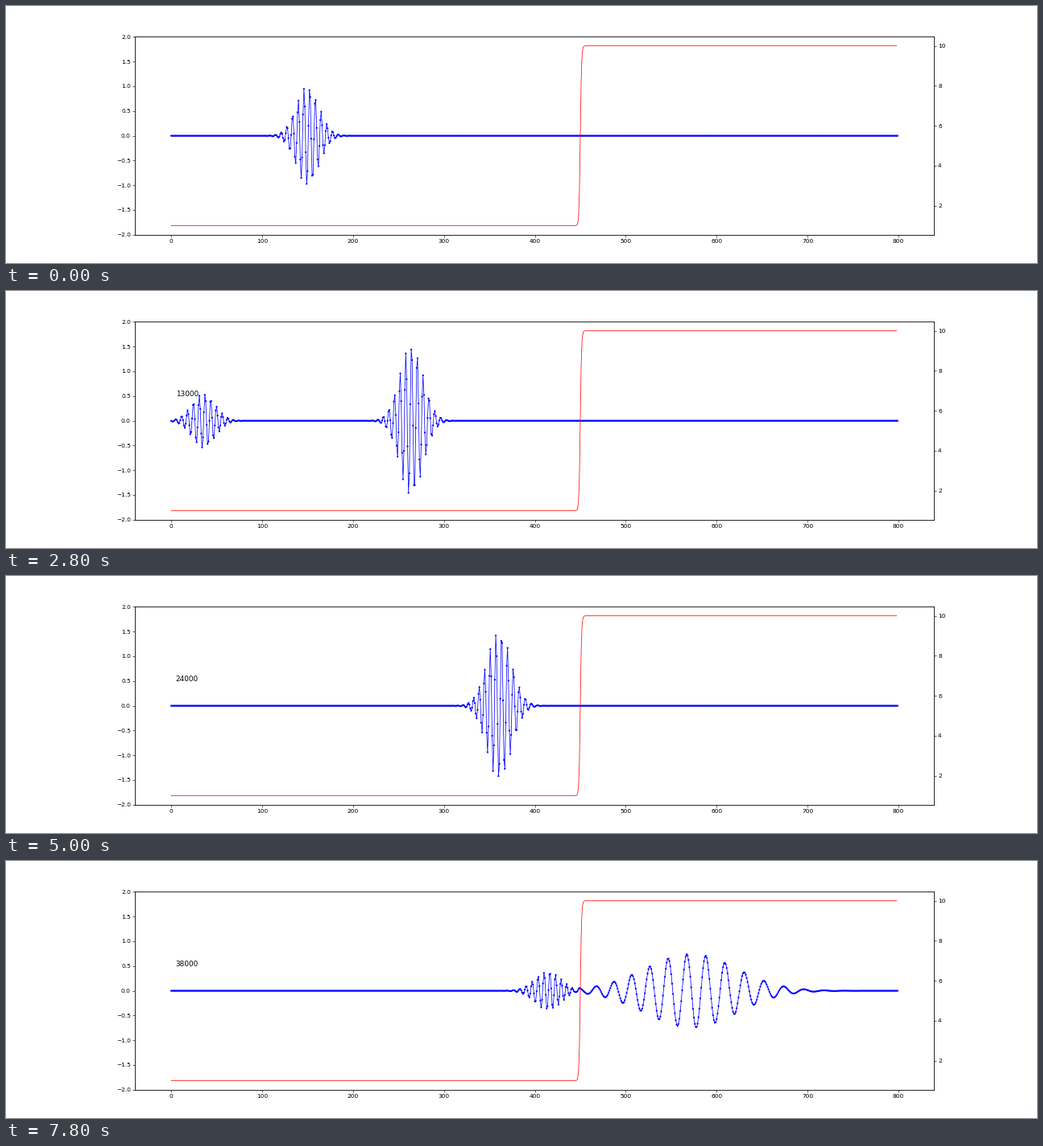
Recreate the animation shown at these times as a matplotlib script. Size 1280x320 px, loop 8000 ms.

```python
import numpy as np
import matplotlib.pyplot as plt
from matplotlib.animation import FuncAnimation

CELLS = 800
PAD = 300              # hidden cells that let the left pulse leave the view
DT = 0.01
STEPS_PER_FRAME = 1000
FRAMES = 40
INTERVAL = 200


def stiffness(x):
    """Smooth step from 1 to 10 around cell 450."""
    return 1 + 4.5 * (1 + np.tanh(0.75 * (x - 450)))


def simulate():
    """Snapshots of u_tt = (g u_x)_x, one per 1000 time steps."""
    x = np.arange(-PAD, CELLS, dtype=float)
    envelope = np.exp(-0.5 * ((x - 150) / 12.5) ** 2)
    u = np.sin(x) * envelope
    v = -2 * np.cos(x) * envelope
    g = stiffness(x[:-1])
    snapshots = [u[PAD:].copy()]
    for _ in range(FRAMES - 2):
        for _ in range(STEPS_PER_FRAME):
            flux = g * (u[1:] - u[:-1])
            v[1:-1] += DT * (flux[1:] - flux[:-1])
            u += DT * v
        snapshots.append(u[PAD:].copy())
    return snapshots


snapshots = simulate()
cells = np.arange(CELLS)

fig = plt.figure(figsize=(24, 6), dpi=1280 / 24)
ax = fig.add_subplot()
wave, = ax.plot(cells, snapshots[0], color="blue", lw=1)
dots = ax.scatter(cells, snapshots[0], s=9, color="blue", zorder=2.1)
dots.set_linewidth([0, 0])  # two widths keep the dots off the pixel grid
counter = ax.text(5, 0.5, "", fontsize=12)
ax.set_xlim(-39.95, 838.95)
ax.set_ylim(-2, 2)

ax_right = ax.twinx()
ax_right.plot(cells[:-1], stiffness(cells[:-1]), color="red", lw=1)
ax_right.set_xlim(-39.95, 838.95)
ax_right.set_ylim(0.55, 10.45)


def update(frame):
    index = max(frame - 1, 0)
    u = snapshots[index]
    wave.set_ydata(u)
    dots.set_offsets(np.column_stack([cells, u]))
    counter.set_text(str(index * STEPS_PER_FRAME) if frame else "")
    return wave, dots, counter


anim = FuncAnimation(fig, update, frames=FRAMES, interval=INTERVAL,
                     repeat=True, repeat_delay=0)
plt.show()
```
